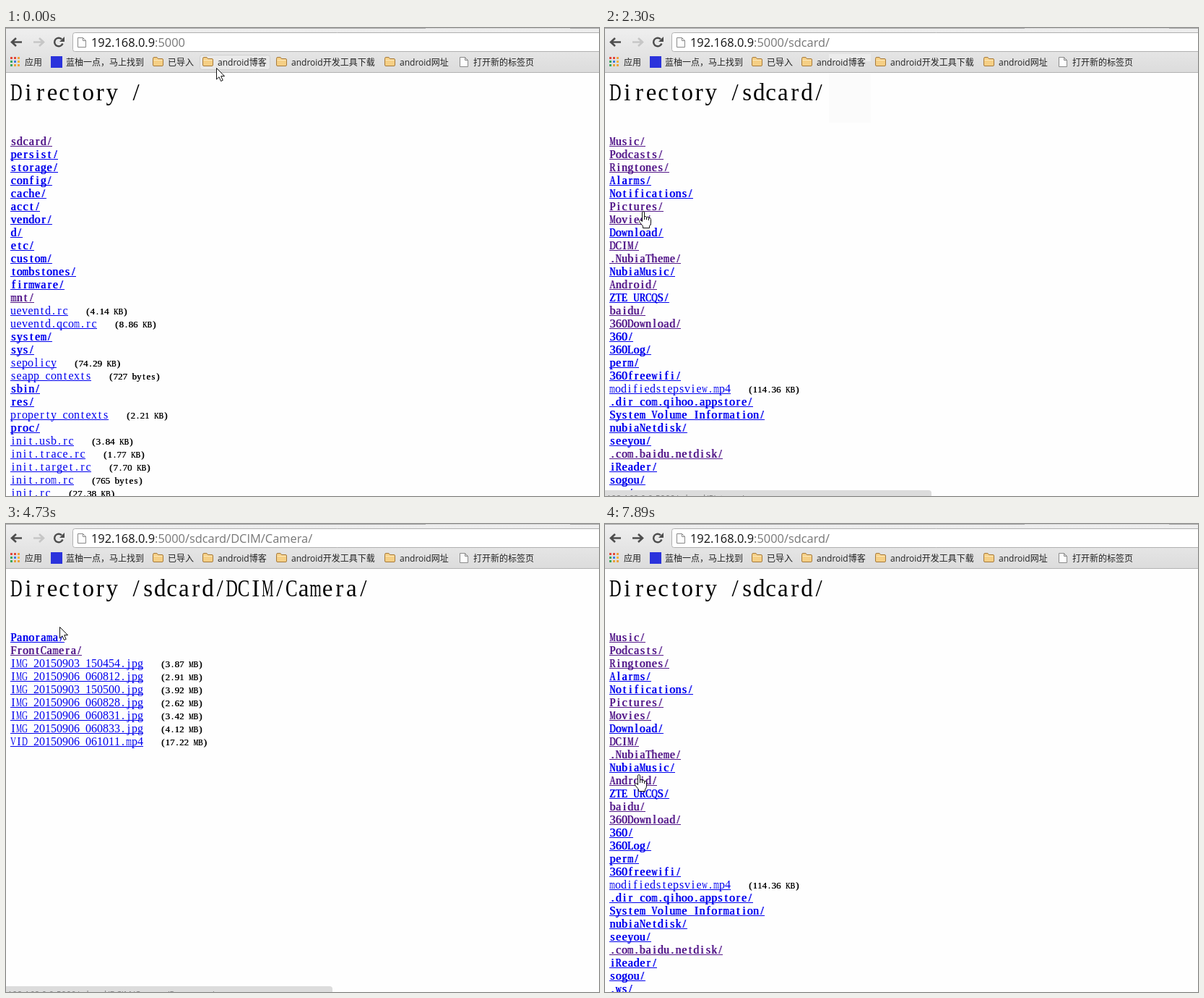
An HTML page with a canvas for the animation above (8 s loop, 821 by 647 pixels).

```html
<!DOCTYPE html>
<html lang="zh">
<head>
<meta charset="utf-8">
<title>Directory listing</title>
<style>
html, body { margin: 0; width: 100%; height: 100%; overflow: hidden; background: #fefefe; }
canvas { display: block; }
</style>
</head>
<body>
<canvas id="stage" width="821" height="647"></canvas>
<script>
const ctx = document.getElementById('stage').getContext('2d');
const LOOP = 8000;
const HOST = '192.168.0.9', PORT = ':5000';
const UI = '"Open Sans", "Noto Sans CJK SC", "Noto Sans CJK", sans-serif';
const SERIF = '"Liberation Serif", serif';
const BLUE = '#0000ee', VISITED = '#551a8b';

// Directories end in "/", visited ones start with "*", files carry their size after "|".
const ROOT = `*sdcard/
persist/
storage/
config/
cache/
acct/
vendor/
d/
etc/
custom/
tombstones/
firmware/
*mnt/
ueventd.rc|4.14 KB
ueventd.qcom.rc|8.86 KB
system/
sys/
sepolicy|74.29 KB
seapp_contexts|727 bytes
sbin/
res/
property_contexts|2.21 KB
proc/
init.usb.rc|3.84 KB
init.trace.rc|1.77 KB
init.target.rc|7.70 KB
init.rom.rc|765 bytes
init.rc|27.38 KB`;
const SDCARD = `*Music/
*Podcasts/
*Ringtones/
Alarms/
Notifications/
*Pictures/
*Movies/
Download/
*DCIM/
*.NubiaTheme/
NubiaMusic/
*Android/
ZTE_URCQS/
*baidu/
*360Download/
360/
360Log/
perm/
360freewifi/
modifiedstepsview.mp4|114.36 KB
.dir_com.qihoo.appstore/
System Volume Information/
nubiaNetdisk/
seeyou/
*.com.baidu.netdisk/
iReader/
sogou/
.ws/`;
const DCIM = `100ANDRO/
*Camera/
.thumbnails/`;
const CAMERA = `Panorama/
*FrontCamera/
IMG_20150903_150454.jpg|3.87 MB
IMG_20150906_060812.jpg|2.91 MB
IMG_20150903_150500.jpg|3.92 MB
IMG_20150906_060828.jpg|2.62 MB
IMG_20150906_060831.jpg|3.42 MB
IMG_20150906_060833.jpg|4.12 MB
VID_20150906_061011.mp4|17.22 MB`;

const ROW = 18, TOP = 148, LEFT = 6, CELL = 8, BOLD_CELL = 8.28;

function parse(text) {
  return text.split('\n').map(line => {
    const visited = line[0] === '*';
    const [name, size] = line.slice(visited ? 1 : 0).split('|');
    const cell = size ? CELL : BOLD_CELL;
    return { name, size, visited, cell, end: LEFT + name.length * cell };
  });
}

const page = (path, text) => ({ path, rows: parse(text) });
const root = page('/', ROOT);
const sdcard = page('/sdcard/', SDCARD);
const dcim = page('/sdcard/DCIM/', DCIM);
const camera = page('/sdcard/DCIM/Camera/', CAMERA);

// Timelines: the last entry at or before the time holds.
const VISITS = [[0, root], [1770, sdcard], [3590, dcim], [4570, camera], [5410, dcim], [6990, sdcard]];
const STATUS = [
  [0, '', 0], [1105, '/sdcard/', 1], [1960, '/sdcard/Podcasts/', 1],
  [2140, '/sdcard/Pictures/', 1], [2600, '/sdcard/Movies/', 1], [2900, '/sdcard/DCIM/', 1],
  [3730, '/sdcard/DCIM/', .7], [3870, '/sdcard/DCIM/', .4], [4010, '', 0],
  [4150, '/sdcard/DCIM/Camera/', 1], [4570, '/sdcard/DCIM/Camera/Panorama/', 1],
  [4990, '/sdcard/DCIM/Camera/Panorama/', .4], [5130, '', 0]
];
const BACK_HOVER = [[0, 0], [5130, 1], [5960, 0], [6560, 1], [7130, 0]];
const POINTER = [
  [0, 291, 55], [120, 282, 62], [400, 190, 112], [690, 80, 150], [969, 33, 164],
  [1414, 33, 164], [1782, 38, 186], [2300, 53, 254], [2600, 50, 270], [3060, 31, 299],
  [3460, 31, 299], [3600, 42, 275], [3876, 74, 197], [4150, 56, 178], [4430, 50, 172],
  [4580, 60, 160], [4720, 74, 142], [5000, 42, 70], [5270, 14, 21], [5560, 14, 21],
  [5827, 36, 68], [6120, 40, 150], [6270, 40, 174], [6420, 36, 110], [6710, 14, 20],
  [6990, 14, 20], [7300, 26, 110], [7600, 40, 250], [7890, 47, 347]
];
// Bursts of screen updates: start, end, number of steps.
const BURSTS = [
  [120, 1110, 8], [1230, 2150, 6], [2300, 3210, 7], [3460, 4430, 8],
  [4580, 5560, 8], [5680, 6710, 8], [6860, 7890, 8]
];

const at = (line, t) => line.filter(k => k[0] <= t).pop();

function snap(t) {
  let shown = 0;
  for (const [start, end, n] of BURSTS) {
    const gap = (end - start) / (n - 1);
    if (t >= start) shown = start + gap * Math.min(n - 1, Math.floor((t - start + 12) / gap));
  }
  return shown;
}

function pointerAt(t) {
  const i = POINTER.findIndex(k => k[0] > t);
  if (i < 0) return POINTER[POINTER.length - 1].slice(1);
  const [t0, x0, y0] = POINTER[i - 1], [t1, x1, y1] = POINTER[i];
  const k = (t - t0) / (t1 - t0);
  return [Math.round(x0 + (x1 - x0) * k), Math.round(y0 + (y1 - y0) * k)];
}

function rect(x, y, w, h, color) {
  ctx.fillStyle = color;
  ctx.fillRect(x, y, w, h);
}

function shape(d, fill, stroke, width = 1) {
  const path = new Path2D(d);
  if (fill) { ctx.fillStyle = fill; ctx.fill(path); }
  if (stroke) { ctx.strokeStyle = stroke; ctx.lineWidth = width; ctx.stroke(path); }
}

function box(x, y, w, h, r, fill, stroke) {
  ctx.beginPath();
  ctx.roundRect(x, y, w, h, r);
  ctx.fillStyle = fill;
  ctx.fill();
  if (stroke) { ctx.strokeStyle = stroke; ctx.lineWidth = 1; ctx.stroke(); }
}

function placed(x, y, draw) {
  ctx.save();
  ctx.translate(x, y);
  draw();
  ctx.restore();
}

function label(s, x, y, size, color) {
  ctx.font = `${size}px ${UI}`;
  ctx.textAlign = 'left';
  ctx.fillStyle = color;
  ctx.fillText(s, x, y);
  return x + ctx.measureText(s).width;
}

// Half-width serif: one glyph per cell, capitals narrowed to the cell.
function mono(s, x, y, size, cell, color, embolden = 0) {
  ctx.font = `${size}px ${SERIF}`;
  ctx.textAlign = 'center';
  ctx.fillStyle = color;
  [...s].forEach((ch, i) => {
    if (ch === ' ' || ch === '_') return;
    const k = Math.min(1, cell / ctx.measureText(ch).width);
    placed(x + (i + .5) * cell, y, () => {
      ctx.scale(k, 1);
      ctx.fillText(ch, 0, 0);
      if (embolden) ctx.fillText(ch, embolden / k, 0);
    });
  });
}

const sheet = (x, y) => placed(x, y, () =>
  shape('M.5 .5H7.5L11.5 4.5V13.5H.5ZM7.5 .5V4.5H11.5', '#fdfdfd', '#8a8a8a'));

const folder = x => placed(x, 40, () => {
  shape('M.5 2.5Q.5 .5 2 .5H6L7.5 2.5H13Q14.5 2.5 14.5 4V11Q14.5 12.5 13 12.5H2Q.5 12.5 .5 11Z', '#f5cf85', '#a67a3c');
  shape('M1.5 4.5H13.5', null, '#fde9bd');
});

const arrowIcon = (x, dir, color) => placed(x, 19.5, () => {
  ctx.scale(dir, 1);
  shape('M-7 0H7M-1 -5.5L-7 0L-1 5.5', null, color, 2.6);
});

function drawToolbar(path, t) {
  const bg = ctx.createLinearGradient(0, 0, 0, 61);
  bg.addColorStop(0, '#efefef');
  bg.addColorStop(1, '#dcdcdc');
  rect(0, 0, 821, 61, bg);
  rect(0, 61, 821, 1, '#b2b2b2');
  rect(0, 0, 821, 1, '#a8a8a8');
  rect(581, 0, 200, 1, '#d6d6d6');

  if (at(BACK_HOVER, t)[1]) box(2.5, 6.5, 26, 26, 3, '#f0f0f0', '#a9a9a9');
  arrowIcon(15, 1, '#4d4d4d');
  arrowIcon(45, -1, t >= 5410 ? '#4d4d4d' : '#c6c6c6');
  ctx.beginPath();
  ctx.arc(73, 19.5, 5.8, .35, 5.5);
  ctx.strokeStyle = '#4d4d4d';
  ctx.lineWidth = 2.4;
  ctx.stroke();
  shape('M81 12V19H74Z', '#4d4d4d');

  box(92.5, 6.5, 735, 26, 3, '#fff', '#b0b0b0');
  sheet(99, 13);
  const x = label(HOST, 118, 26, 16.4, '#111');
  label(PORT + (path === '/' ? '' : path), x, 26, 16.4, '#777');

  if (t < 120) box(268.5, 37.5, 97, 20, 3, '#e9e9e9', '#d0d0d0');
  else if (t < 3460) rect(t < 1770 ? 268 : 310, 36, t < 1770 ? 100 : 58, 10, '#ececec');

  const dots = ['#e2493b', '#e2493b', '#f0a13a', '#3da75a', '#3f7de0', '#f0b43a', '#3da75a', '#e9a23b', '#e9a23b'];
  dots.forEach((c, i) => rect(6 + i % 3 * 5, 40 + Math.floor(i / 3) * 5, 3, 3, c));
  rect(62, 39, 16, 16, '#2b33dc');
  [203, 272, 374, 524].forEach(folder);
  sheet(628, 40);
  const marks = [
    ['应用', 26], ['蓝柚一点，马上找到', 83], ['已导入', 224], ['android博客', 293],
    ['android开发工具下载', 395], ['android网址', 545], ['打开新的标签页', 647]
  ];
  marks.forEach(([s, x]) => label(s, x, 52, 12, '#222'));
}

function drawListing({ path, rows }) {
  mono('Directory ' + path, LEFT, 100, 33, 16.57, '#000');
  rows.forEach(({ name, size, visited, cell, end }, i) => {
    const y = TOP + 14 + i * ROW;
    const color = visited ? VISITED : BLUE;
    mono(name, LEFT, y, 16, cell, color, size ? 0 : .75);
    rect(LEFT, y + 1, Math.round(end - LEFT), 1, color);
    if (size) mono(`(${size})`, end + 24, y, 13, 6.5, '#000', .3);
  });
}

function drawStatus(t) {
  const [, path, alpha] = at(STATUS, t);
  if (!alpha) return;
  ctx.globalAlpha = alpha;
  box(-4, 639, 456, 20, 4, '#dcdcdc');
  label(HOST + PORT + path, 2, 655, 12, '#808080');
  ctx.globalAlpha = 1;
}

function drawPointer(rows, t) {
  const [x, y] = pointerAt(t);
  const row = rows[Math.floor((y - TOP) / ROW)];
  const onLink = row && x >= LEFT && x < row.end;
  placed(x, y, () => {
    if (onLink) {
      shape('M-1.5 .5Q0 -1.5 1.5 .5V7Q3 5.5 4.5 7.5Q6.5 6 7.5 8.5Q10 7.5 10.5 10.5V15Q10.5 18 8.5 20V22.5H-.5V20L-5 14.5Q-6.5 12 -4.5 11.5Q-3 11.5 -1.5 13.5Z', '#fff', '#111');
      shape('M1.5 7V11M4.5 8V11M7.5 9V12', null, '#111');
    } else {
      shape('M.5 .5V16L4 12.7L6.6 18.5L9.2 17.3L6.7 11.6H11.5Z', '#fff', '#111');
    }
  });
}

function draw(time) {
  const t = snap(time % LOOP);
  const current = at(VISITS, t)[1];
  rect(0, 0, 821, 647, '#fefefe');
  if (t >= 120 && t < 3460) {
    const x = t < 1770 ? 265 : 310;
    rect(x, 64, 368 - x, 67, '#fbfbfb');
  }
  drawToolbar(current.path, t);
  drawListing(current);
  drawStatus(t);
  drawPointer(current.rows, t);
}

const start = performance.now();
function tick() {
  draw(performance.now() - start);
  requestAnimationFrame(tick);
}
tick();
</script>
</body>
</html>
```
